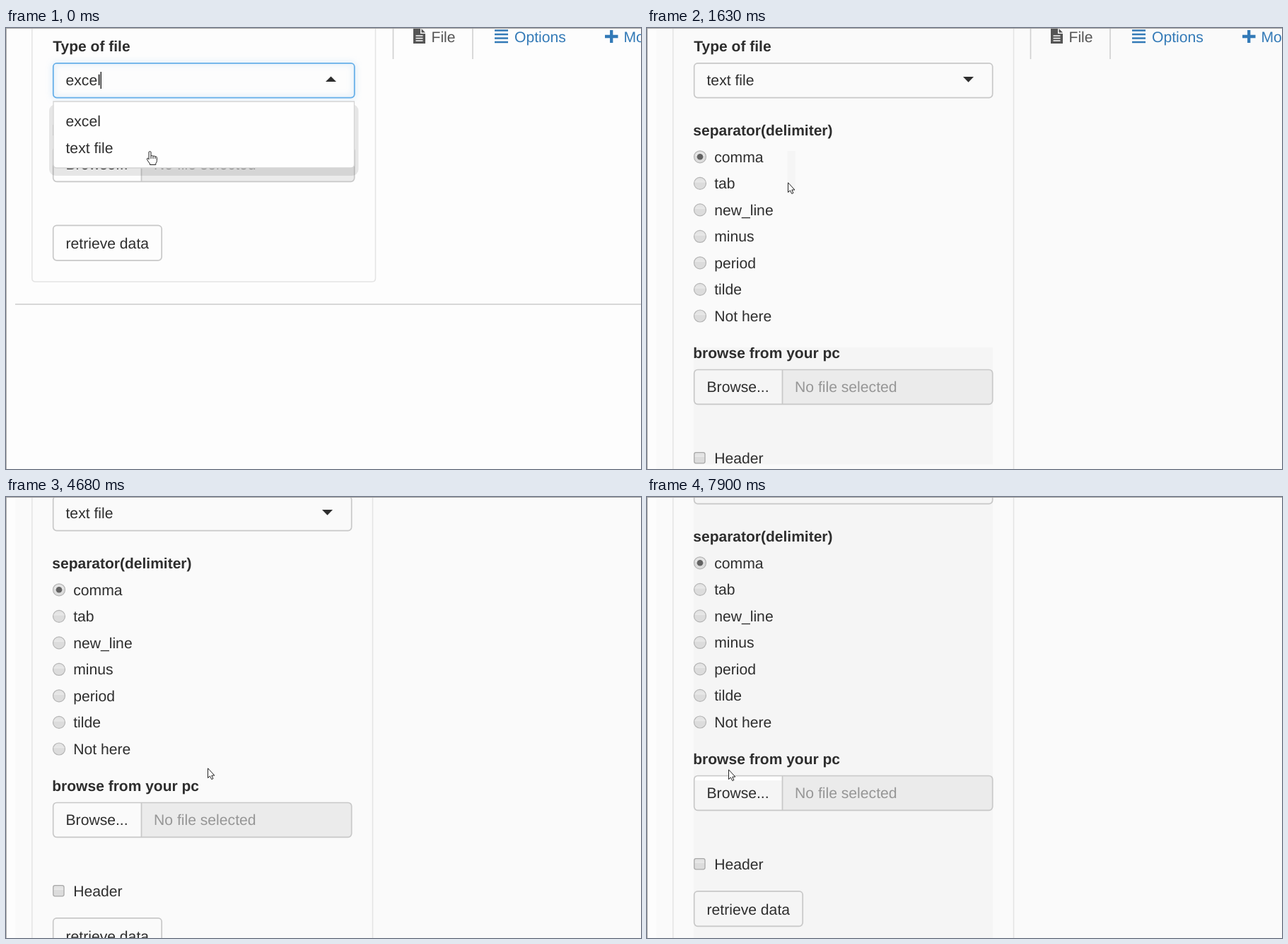
These frames come from a looping animation (898x624 px, 8 s). An HTML page:

```html
<!DOCTYPE html>
<html lang="en">
<head>
<meta charset="utf-8">
<title>File import form</title>
<style>
html, body { margin: 0; width: 100%; height: 100%; overflow: hidden; background: #fdfdfd; }
svg { display: block; width: 898px; height: 624px; }
text { font: 21.15px "Liberation Sans", Arial, sans-serif; fill: #2e2e2e; text-rendering: geometricPrecision; }
.label { font-size: 21px; font-weight: bold; }
.hint { fill: #969696; }
.link { fill: #337ab7; }
.tab { fill: #555; }
.box { fill: none; stroke: #c8c8c8; stroke-width: 1.7; }
.well { fill: none; stroke: #e4e4e4; stroke-width: 1.5; }
.field { fill: #ebebeb; }
.glow { fill: none; stroke: #66afe9; stroke-width: 1.8; filter: drop-shadow(0 0 4px rgba(102,175,233,.6)); }
.patch { fill: #f5f5f5; }
.pointer { fill: #fff; stroke: #222; stroke-width: 1; stroke-linejoin: round; }

/* every change is a hard cut on an 8 s loop */
.anim { animation: 8s step-end infinite; }
#first { animation-name: first; }
#second { animation-name: second; }
#open { animation-name: open; }
#closed { animation-name: closed; }
#caret { animation-name: caret; }
#hover { animation-name: hover; }
#lower { animation-name: lower; }
#page { animation-name: scroll; }
#patchLow { animation-name: patchLow; }
#patchAll { animation-name: patchAll; }
#trail1 { animation-name: trail1; }
#trail2 { animation-name: trail2; }
#trail3 { animation-name: trail3; }
#strip { animation-name: strip; }
#cursor { animation-name: move; }
#arrow { animation-name: arrow; }
#hand { animation-name: hand; }
#beam { animation-name: beam; }

@keyframes first { 0% { opacity: 1 } 10.375%, to { opacity: 0 } }
@keyframes second { 0% { opacity: 0 } 10.375%, to { opacity: 1 } }
@keyframes open { 0% { opacity: 1 } 8.875%, to { opacity: 0 } }
@keyframes closed { 0% { opacity: 0 } 8.875%, to { opacity: 1 } }
@keyframes caret { 0% { opacity: 1 } 1.875%, to { opacity: 0 } }
@keyframes hover { 0% { opacity: 0 } 1.875%, to { opacity: 1 } }
@keyframes lower { 0% { transform: translateY(30px) } 11.875%, to { transform: none } }
@keyframes scroll {
  0% { transform: none }
  58.5% { transform: translateY(-51px) }
  60%, to { transform: translateY(-89px) }
}
@keyframes patchLow { 0%, 58.5%, to { opacity: 0 } 11.875% { opacity: 1 } }
@keyframes patchAll { 0% { opacity: 0 } 60%, to { opacity: 1 } }
@keyframes trail1 { 0%, 58.5%, to { opacity: 0 } 20.375% { opacity: 1 } }
@keyframes trail2 { 0%, 58.5%, to { opacity: 0 } 21.875% { opacity: 1 } }
@keyframes trail3 { 0%, 58.5%, to { opacity: 0 } 23.375% { opacity: 1 } }
@keyframes strip { 0% { opacity: 0 } 98.75%, to { opacity: 1 } }

@keyframes move {
  0% { transform: translate(204px, 174px) }
  1.875% { transform: translate(199px, 187px) }
  3.875% { transform: translate(199px, 175px) }
  20.375% { transform: translate(199px, 218px) }
  21.875% { transform: translate(204px, 370px) }
  23.375% { transform: translate(220px, 469px) }
  24.875% { transform: translate(220px, 483px) }
  26.75% { transform: translate(220px, 524px) }
  51.125% { transform: translate(355px, 495px) }
  53.125% { transform: translate(337px, 404px) }
  55% { transform: translate(289px, 380px) }
  58.5% { transform: translate(285px, 383px) }
  65.375% { transform: translate(274px, 358px) }
  66.875% { transform: translate(263px, 343px) }
  68.75% { transform: translate(242px, 302px) }
  70.625% { transform: translate(226px, 288px) }
  72.125% { transform: translate(210px, 275px) }
  73.625% { transform: translate(196px, 265px) }
  77.375% { transform: translate(155px, 248px) }
  78.875% { transform: translate(120px, 222px) }
  80.375% { transform: translate(99px, 203px) }
  81.875% { transform: translate(71px, 198px) }
  83.375% { transform: translate(105px, 337px) }
  85.125% { transform: translate(81px, 234px) }
  87% { transform: translate(70px, 85px) }
  88.5% { transform: translate(70px, 106px) }
  90.375% { transform: translate(72px, 134px) }
  92.375% { transform: translate(75px, 225px) }
  94.25% { transform: translate(84px, 262px) }
  95.75% { transform: translate(96px, 310px) }
  97.25% { transform: translate(108px, 352px) }
  98.75%, to { transform: translate(115px, 385px) }
}
@keyframes arrow {
  0%, 28.25%, 78.875%, 87%, 92.375%, 95.75% { opacity: 0 }
  8.875%, 53.125%, 83.375%, 90.375%, 94.25%, 97.25%, to { opacity: 1 }
}
@keyframes hand {
  0%, 78.875%, 87%, 92.375%, 95.75% { opacity: 1 }
  8.875%, 83.375%, 90.375%, 94.25%, 97.25%, to { opacity: 0 }
}
@keyframes beam { 0%, 53.125%, to { opacity: 0 } 51.125% { opacity: 1 } }
</style>
</head>
<body>
<svg viewBox="0 0 898 624">
  <defs>
    <linearGradient id="knob" x2="0" y2="1">
      <stop offset="0" stop-color="#e0e0e0"/>
      <stop offset=".4" stop-color="#e8e8e8"/>
      <stop offset=".45" stop-color="#dcdcdc"/>
      <stop offset="1" stop-color="#dcdcdc"/>
    </linearGradient>
    <circle id="radio" cx="75" cy="182.3" r="8.5" fill="url(#knob)" stroke="#b5b5b5" stroke-width="1.2"/>
    <g id="tabs">
      <path d="M547.5 1V44M660 1V44" stroke="#d0d0d0" stroke-width="1.6"/>
      <path class="tab" d="M576 1H586V8H593V22H576ZM587.5 1L593 6.5H587.5Z"/>
      <path d="M579.5 11H589.5M579.5 14.5H589.5M579.5 18H589.5" stroke="#fdfdfd" stroke-width="1.5"/>
      <text class="tab" x="601.5" y="20">File</text>
      <path d="M691 3.5H710M691 9H710M691 14.5H710M691 20H710" stroke="#337ab7" stroke-width="2.7"/>
      <text class="link" x="719" y="20">Options</text>
      <path d="M847 12H865.5M856.2 3V21" stroke="#337ab7" stroke-width="4.3"/>
      <text class="link" x="873.5" y="20">More</text>
    </g>
    <g id="upload">
      <text class="label" x="65.3" y="467">browse from your pc</text>
      <path d="M191.5 483.500V532" stroke="#c8c8c8" stroke-width="1.7"/>
      <text x="84.5" y="515">Browse...</text>
      <text class="hint" x="209" y="515">No file selected</text>
    </g>
    <g id="fetch">
      <rect class="box" x="66.7" y="279.3" width="153.5" height="49.5" rx="5"/>
      <text x="84.5" y="312">retrieve data</text>
    </g>
  </defs>

  <rect width="898" height="624" fill="#fdfdfd"/>

  <g id="first" class="anim">
    <path class="well" d="M36.8 1V354Q36.8 359 41.8 359H517.5Q522.5 359 522.5 354V1"/>
    <path d="M13 390.8H898" stroke="#d2d2d2" stroke-width="1.7"/>
    <use href="#tabs"/>
    <text class="label" x="66.3" y="33">Type of file</text>
    <path class="field" d="M192 169H488Q493 169 493 174V212Q493 217 488 217H192Z"/>
    <rect class="box" x="66.7" y="168.5" width="426" height="48.8" rx="5"/>
    <use href="#upload" y="-315"/>
    <use href="#fetch"/>
    <g id="open" class="anim">
      <rect class="glow" x="66.8" y="49.8" width="426" height="48.8" rx="5"/>
      <text x="84.5" y="81">excel</text>
      <path id="caret" class="anim" d="M134.3 62V86" stroke="#222" stroke-width="1.4"/>
      <path d="M452 76L459.5 68.5L467 76Z" fill="#2e2e2e"/>
      <rect x="61" y="108" width="437.5" height="101" rx="9" opacity=".09"/>
      <path d="M67 104H492.5V193Q492.5 198 487.5 198H72Q67 198 67 193Z" fill="#fefefe" stroke="#d4d4d4" stroke-width="1.3"/>
      <rect id="hover" class="anim patch" x="67.5" y="151" width="424.5" height="39"/>
      <text x="84.5" y="139">excel</text>
      <text x="84.5" y="177">text file</text>
    </g>
    <g id="closed" class="anim">
      <rect class="box" x="66.7" y="49.8" width="426" height="48.8" rx="5"/>
      <text x="84.5" y="81">text file</text>
      <path d="M452 69H467L459.5 76.8Z" fill="#2e2e2e"/>
    </g>
  </g>

  <g id="second" class="anim">
    <rect x="13" width="885" height="624" fill="#fafafa"/>
    <rect id="patchLow" class="anim patch" x="66" y="452" width="423" height="165.5"/>
    <rect id="patchAll" class="anim patch" x="66" width="423" height="624"/>
    <rect id="trail1" class="anim patch" x="198.5" y="174" width="11.5" height="60"/>
    <rect id="trail2" class="anim patch" x="198.5" y="218" width="15.5" height="168"/>
    <rect id="trail3" class="anim patch" x="203.5" y="371" width="27" height="114"/>
    <path class="well" d="M36.8 0V624M518.5 0V624"/>
    <g id="page" class="anim">
      <use href="#tabs" x="-5"/>
      <text class="label" x="66.3" y="33">Type of file</text>
      <rect class="box" x="66.7" y="49.8" width="422" height="48.8" rx="5"/>
      <text x="84.5" y="81">text file</text>
      <path d="M447 69H462L454.5 76.8Z" fill="#2e2e2e"/>
      <text class="label" x="65.3" y="152">separator(delimiter)</text>
      <use href="#radio"/>
      <circle cx="75" cy="182.3" r="4.3" fill="#626262"/>
      <use href="#radio" y="37.55"/>
      <use href="#radio" y="75.1"/>
      <use href="#radio" y="112.65"/>
      <use href="#radio" y="150"/>
      <use href="#radio" y="187.6"/>
      <use href="#radio" y="225.2"/>
      <text x="95.2" y="190">comma</text>
      <text x="95.2" y="227">tab</text>
      <text x="95.2" y="265">new_line</text>
      <text x="95.2" y="302">minus</text>
      <text x="95.2" y="340">period</text>
      <text x="95.2" y="377">tilde</text>
      <text x="95.2" y="415">Not here</text>
      <g id="lower" class="anim">
        <path class="field" d="M192 484H484Q489 484 489 489V527Q489 532 484 532H192Z"/>
        <rect id="strip" class="anim" x="68" y="484.3" width="122.7" height="5.7" fill="#fff"/>
        <rect class="box" x="66.7" y="483.5" width="422" height="48.8" rx="5"/>
        <use href="#upload"/>
        <rect x="66.8" y="600.6" width="15.2" height="15.2" rx="2.5" fill="url(#knob)" stroke="#a8a8a8" stroke-width="1.3"/>
        <text x="95.2" y="616">Header</text>
        <use href="#fetch" y="367.5"/>
      </g>
    </g>
  </g>

  <path d="M.5 0V624" stroke="#b0b0b0"/>
  <path d="M0 .5H898" stroke="#a4a4a4"/>

  <g id="cursor" class="anim">
    <path id="arrow" class="anim pointer" d="M.5 .8V14.5L3.4 11.8L5.8 16.5L7.9 15.5L5.8 11H9.9Z"/>
    <path id="hand" class="anim pointer" d="M-2 12V2Q-2 .6-.5 .6T1 2V7Q2.5 5.8 4 7.3Q6 6.4 7 8Q9.3 7.4 9.4 9.5V13.5Q9.4 16 7.8 17.5V19.5H-.5V18Q-3 15-4.5 12.2Q-5 10.4-3.8 10.2Q-2.8 10.2-2 12ZM1 7V11M4 7.5V11M7 8.2V11"/>
    <path id="beam" class="anim" d="M-3-6.5H-.7L0-6L.7-6.5H3M0-6V6M-3 6.5H-.7L0 6L.7 6.5H3" fill="none" stroke="#222" stroke-width="1.2"/>
  </g>
</svg>
</body>
</html>
```
